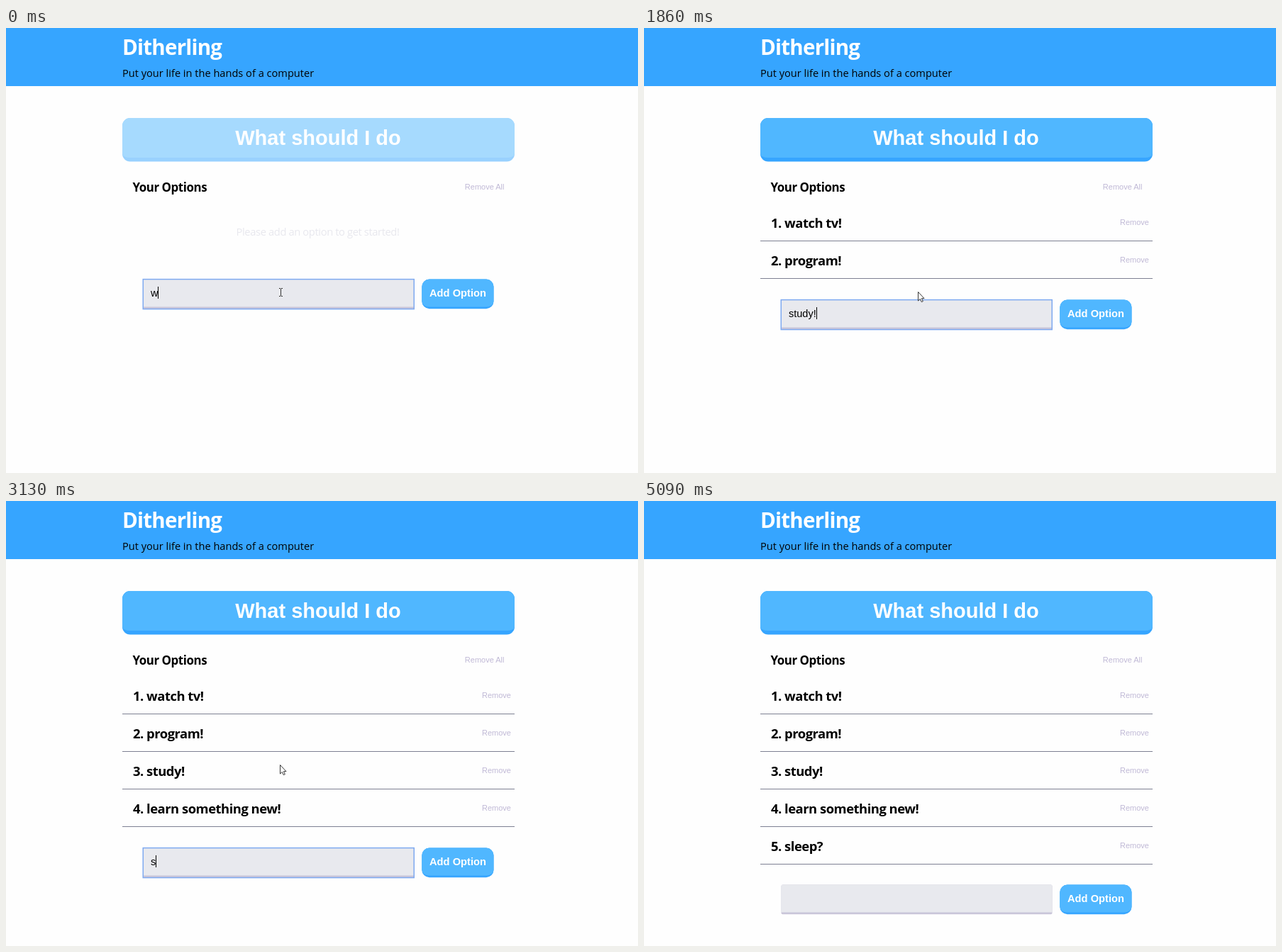
Write an HTML page that moves like this. It is 891 px wide and 628 px high and loops after 5.11 s.

```html
<!DOCTYPE html>
<html lang="en">
<head>
<meta charset="utf-8">
<title>Options</title>
<style>
  html, body { margin: 0; height: 100%; overflow: hidden; background: #fefefe; }
  svg { display: block; width: 100%; height: 100%; }
  text { white-space: pre; font-family: "Open Sans", "Noto Sans", sans-serif; }
  .bold { font-weight: 700; letter-spacing: -.026em; }
  .item { font-size: 18.4px; }
  .arial { font-family: "Liberation Sans", Arial, sans-serif; }
  .button { font-weight: 700; fill: #fff; text-anchor: middle; }
  .link { font-size: 11px; fill: #c0b9d6; text-anchor: end; }
  .face { fill: #50b7ff; }
  .edge { fill: #36a5ff; }
</style>
</head>
<body>
<svg id="stage" viewBox="0 0 891 628">
  <rect class="edge" width="891" height="82"/>
  <text class="bold" x="164" y="38" font-size="29.5" fill="#fff">Ditherling</text>
  <text x="164" y="69" font-size="14.6">Put your life in the hands of a computer</text>

  <g id="ask"></g>
  <text class="arial button" x="440" y="165" font-size="29">What should I do</text>

  <text class="bold" x="178.5" y="231" font-size="16.9">Your Options</text>
  <text class="arial link" x="702.5" y="228">Remove All</text>
  <text id="hint" x="324.5" y="292.5" font-size="14.75" letter-spacing="-.027em" fill="#e8e8ee">Please add an option to get started!</text>
  <g id="rows"></g>

  <g id="form">
    <g id="field"></g>
    <rect id="ring" x="193.25" y=".6" width="382" height="42" fill="none" stroke="#7ea9f0" stroke-width="1.5"/>
    <text id="input" class="arial" x="204" y="25.3" font-size="14.5"></text>
    <rect id="caret" y="11" width="1" height="17"/>
    <g id="add"></g>
    <text class="arial button" x="637" y="25" font-size="14.7">Add Option</text>
  </g>

  <path id="beam" d="M385 367.5h2m1 0h2M387.5 368v10M385 378.5h2m1 0h2" fill="none" stroke="#333"/>
  <path id="arrow" d="M.5 .5V13L3.3 10.4 5.3 14.6 7.3 13.7 5.4 9.6H9Z" fill="#fff" stroke="#222" stroke-width=".9"/>
</svg>
<script>
const LOOP = 5110, ROW = 52.9;
const $ = id => document.getElementById(id);
const show = (id, on) => $(id).setAttribute('display', on ? 'inline' : 'none');
const move = (id, x, y) => $(id).setAttribute('transform', `translate(${x} ${y})`);

// Rounded box with a thicker bottom edge
function panel(id, x, y, w, h, r, edge, face = 'class="face"', base = 'class="edge"') {
  const ry = Math.max(r - edge, 0);
  $(id).innerHTML = `<rect x="${x}" y="${y}" width="${w}" height="${h}" rx="${r}" ${base}/>
    <path ${face} d="M${x + r} ${y}h${w - 2 * r}a${r} ${r} 0 0 1 ${r} ${r}V${y + h - edge - ry}
    a${r} ${ry} 0 0 1 ${-r} ${ry}h${2 * r - w}a${r} ${ry} 0 0 1 ${-r} ${-ry}V${y + r}a${r} ${r} 0 0 1 ${r} ${-r}z"/>`;
}
panel('ask', 164, 127, 553, 61.5, 11, 5.5);
panel('add', 586.3, .6, 101.2, 41.6, 10.5, 2.8);
panel('field', 193.5, .6, 382, 41.6, 2, 2.8, 'fill="#e8e9ee"', 'fill="#c9c5d9"');

const items = ['watch tv!', 'program!', 'study!', 'learn something new!', 'sleep?'];
const added = [710, 1370, 1940, 2980, 4100];
$('rows').innerHTML = items.map((item, i) => `<g transform="translate(0 ${Math.round(i * ROW)})">
  <text class="bold item" x="179" y="281.5">${i + 1}. ${item}</text>
  <text class="arial link" x="712" y="278">Remove</text>
  <rect x="164" y="300" width="553" height="1" fill="#7d8092"/></g>`).join('');
const rows = [...$('rows').children];

// Typing bursts: time of the first key, time of the last key, keys
const bursts = [
  [0, 0, 'w'], [40, 430, 'atch tv'], [570, 570, '!'],
  [860, 1130, 'program'], [1240, 1240, '!'],
  [1500, 1740, 'study'], [1860, 1860, '!'],
  [2110, 2110, 'l'], [2110, 2250, 'earn'], [2390, 2750, ' something new'], [2840, 2840, '!'],
  [3130, 3320, 'sleep'], [3970, 3970, '?']
];
const caretOff = [[3510, 3660], [3840, 3970], [4270, 4450], [4620, 4790], [5090, LOOP]];

function typed(t, since) {
  let text = '';
  for (const [start, end, keys] of bursts) {
    if (start < since || t < start) continue;
    const gap = (end - start) / (keys.length - 1 || 1);
    text += keys.slice(0, gap ? Math.floor((t - start) / gap + 1.001) : 1);
  }
  return text;
}

function pointer(t) {
  const k = Math.max(0, Math.floor((t - 4450) / 45));
  return k < 2 ? [386 + 223.5 * k, 372 + 101 * k] : [833 - (k - 2) / 4, 574 + (k - 2) * 6.75];
}

function draw(t) {
  const n = added.filter(a => t >= a).length;
  $('ask').setAttribute('opacity', n ? 1 : .5);
  show('hint', !n);
  rows.forEach((row, i) => row.setAttribute('display', i < n ? 'inline' : 'none'));
  move('form', 0, n ? Math.round(329.8 + (n - 1) * ROW) : 354);

  $('input').textContent = typed(t, n ? added[n - 1] : 0);
  $('caret').setAttribute('x', Math.round(204 + $('input').getComputedTextLength()));
  show('caret', !caretOff.some(([a, b]) => t >= a && t < b));
  show('ring', t < 5090);

  show('beam', !n);
  show('arrow', n && t < 4910);
  move('arrow', ...pointer(t));
}

function frame() {
  draw(performance.now() % LOOP);
  requestAnimationFrame(frame);
}
frame();
</script>
</body>
</html>
```
